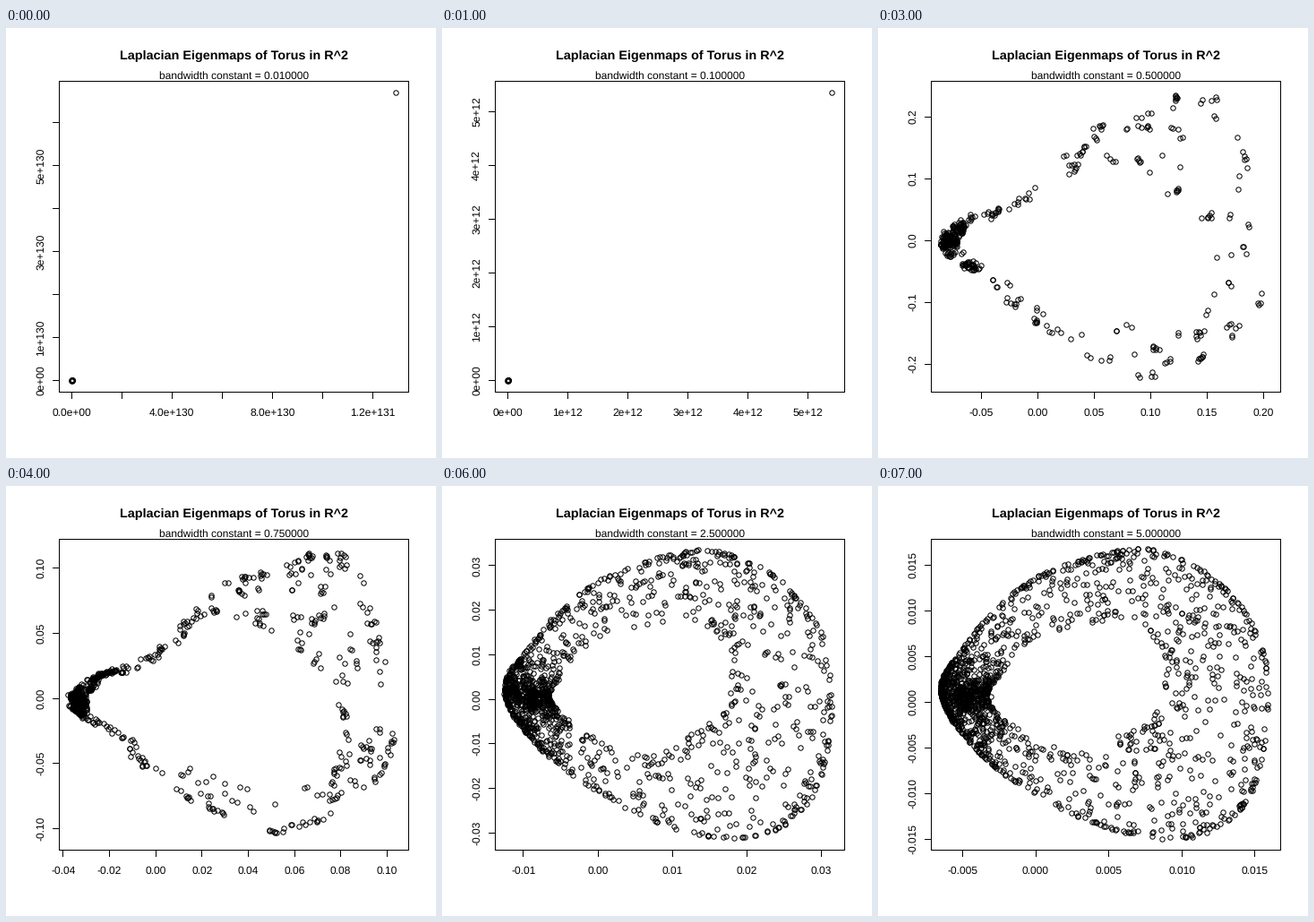
A matplotlib script for the animation above (8000 ms loop, 480 by 480 pixels).

```python
import numpy as np
import matplotlib
import matplotlib.pyplot as plt
from matplotlib.animation import ArtistAnimation

matplotlib.rcParams["font.family"] = "Liberation Sans"
matplotlib.rcParams["text.hinting"] = "none"

PX = 0.75  # points per pixel at 96 dpi
LEFT, RIGHT, TOP, BOTTOM = 59, 449, 59, 406

# Key points of the band, clockwise from its left tip, before and after it rounds out.
OUTER_EARLY = [(72, 240), (100, 213), (165, 186), (240, 112), (300, 95), (350, 73),
               (395, 100), (434, 270), (390, 348), (292, 388), (190, 338), (112, 276)]
OUTER_LATE = [(71, 236), (95, 180), (160, 112), (235, 80), (310, 72), (385, 112),
              (430, 185), (432, 285), (405, 360), (340, 393), (240, 376), (130, 313)]
INNER_EARLY = [(88, 240), (112, 210), (155, 203), (230, 155), (285, 155), (325, 190),
               (358, 235), (375, 255), (372, 295), (345, 338), (210, 318), (105, 258)]
INNER_LATE = [(122, 236), (138, 208), (168, 172), (215, 158), (280, 150), (312, 175),
              (320, 210), (310, 250), (275, 272), (240, 295), (195, 290), (148, 265)]

fig = plt.figure(figsize=(5, 5), dpi=96, facecolor="white")
ax = fig.add_axes([0, 0, 1, 1])
ax.set_xlim(0, 480)
ax.set_ylim(480, 0)
ax.axis("off")


def line(xs, ys):
    return ax.plot(xs, ys, color="black", lw=PX)[0]


def label(x, y, s, size=12, **kw):
    return ax.text(x, y, s, fontsize=size * PX, ha="center", va="baseline",
                   rotation_mode="anchor", **kw)


def blend(a, b, mix):
    return np.array(a) * (1 - mix) + np.array(b) * mix


def smooth(keys, t):
    """Closed Catmull-Rom curve through the key points."""
    i = np.floor(t).astype(int)
    f = (t - i)[:, None]
    a, b, c, d = (keys[(i + k) % len(keys)] for k in (-1, 0, 1, 2))
    return b + f / 2 * (c - a + f * (2 * a - 5 * b + 4 * c - d + f * (3 * (b - c) + d - a)))


def band(n, mix, clump):
    """Flattened torus: points crowd its rims and its left tip, and gather at hubs."""
    rng = np.random.default_rng(11)
    outer = blend(OUTER_EARLY, OUTER_LATE, mix)
    inner = blend(INNER_EARLY, INNER_LATE, mix)

    def draw(m, tip=0.0):
        t = np.where(rng.random(m) < tip, rng.normal(0, 0.55, m), rng.uniform(0, 12, m))
        return np.column_stack([t, rng.beta(0.65, 0.38, m)])

    p, hubs = draw(n, 0.36), draw(130, 0.1)
    near = hubs[(np.abs(p[:, None] - hubs) * [1, 3]).sum(axis=2).argmin(axis=1)]
    p += (near - p) * clump * rng.random((n, 1)) ** (1 - clump)
    w = p[:, 1:]
    pts = smooth(inner, p[:, 0]) * (1 - w) + smooth(outer, p[:, 0]) * w

    size = (inner[0, 0] - outer[0, 0]) * 0.2
    core = rng.normal(blend(outer[0], inner[0], 0.55), size, (n // 12, 2))
    return np.vstack([pts + rng.normal(0, 2 * clump, pts.shape), core])


def outlier():
    rng = np.random.default_rng(11)
    return np.vstack([rng.normal((73.5, 393.5), 0.4, (8, 2)), [(435.3, 72)]])


def scatter():
    """Flat dense heap with a long tail to the right and a few far points."""
    rng = np.random.default_rng(11)
    x = np.append(rng.normal(210, 11, 170), rng.normal(245, 10, 80))
    heap = np.column_stack([x, rng.normal(366 - 0.18 * (x - 210), 6)])
    tail = np.column_stack([225 + rng.exponential(60, 34).clip(0, 200), rng.normal(363, 13, 34)])
    far = [(73, 72), (245, 289), (251, 293), (238, 308), (274, 308), (224, 332),
           (209, 347), (158, 356), (149, 383), (349, 341), (388, 348), (435, 373)]
    sites = np.vstack([tail, far])
    sites = np.repeat(sites, rng.integers(1, 5, len(sites)), axis=0)
    return np.vstack([heap, sites + rng.normal(0, 0.4, sites.shape)])


def ticks(zero, gap, lo, hi, unit, form):
    """Tick places and labels; a label too close to the one before is left blank."""
    end = -np.inf
    for k in range(lo, hi + 1):
        text = form % (k * unit)
        half = 6.7 * len(text) / 2
        at = abs(gap) * k
        shown = at - half - 10 > end
        if shown:
            end = at + half
        yield zero + gap * k, text if shown else ""


# bandwidth, points, then per axis: zero, tick gap, first and last tick, unit, format
STATES = [
    (0.01, outlier(), (73.4, 56, 0, 6, 2e130, "%.1e"), (393.5, -48, 0, 6, 1e130, "%.0e")),
    (0.1, outlier(), (73.4, 67, 0, 5, 1e12, "%.0e"), (393.5, -60, 0, 5, 1e12, "%.0e")),
    (0.25, scatter(), (211.5, 53, -2, 4, 0.5, "%.1f"), (367.4, -64.1, 0, 4, 2, "%d")),
    (0.5, band(420, 0, 0.9), (178, 63, -1, 4, 0.05, "%.2f"), (237, -69, -2, 2, 0.1, "%.1f")),
    (0.75, band(720, 0, 0.75), (167.2, 51.6, -2, 5, 0.02, "%.2f"),
     (237, -72.8, -2, 2, 0.05, "%.2f")),
    (1, band(950, 0.5, 0.65), (170.4, 69, -1, 4, 0.02, "%.2f"),
     (234.4, -97.2, -1, 1, 0.05, "%.2f")),
    (2.5, band(1350, 0.95, 0.3), (174, 83.1, -1, 3, 0.01, "%.2f"),
     (238, -49.7, -3, 3, 0.01, "%.2f")),
    (5, band(1550, 1, 0.12), (176, 81.6, -1, 3, 0.005, "%.3f"),
     (241.2, -51, -3, 3, 0.005, "%.3f")),
]


def scene(width, pts, xaxis, yaxis):
    art = [label(254.4, 57, "bandwidth constant = %f" % width)]
    art += ax.plot(pts[:, 0], pts[:, 1], "o", ms=5.4 * PX, mew=PX, mfc="none", mec="black")
    for x, s in ticks(*xaxis):
        art += [line([x - 0.5, x - 0.5], [BOTTOM, 413]), label(x, 433, s)]
    for y, s in ticks(*yaxis):
        art += [line([52, LEFT], [y - 0.5, y - 0.5]), label(42, y, s, rotation=90)]
    return art


label(254.4, 35, "Laplacian Eigenmaps of Torus in R^2", 14.4, weight="bold")
line([LEFT, RIGHT, RIGHT, LEFT, LEFT], [TOP, TOP, BOTTOM, BOTTOM, TOP])

anim = ArtistAnimation(fig, [scene(*s) for s in STATES], interval=1000,
                       repeat=True, repeat_delay=0, blit=False)
plt.show()
```
